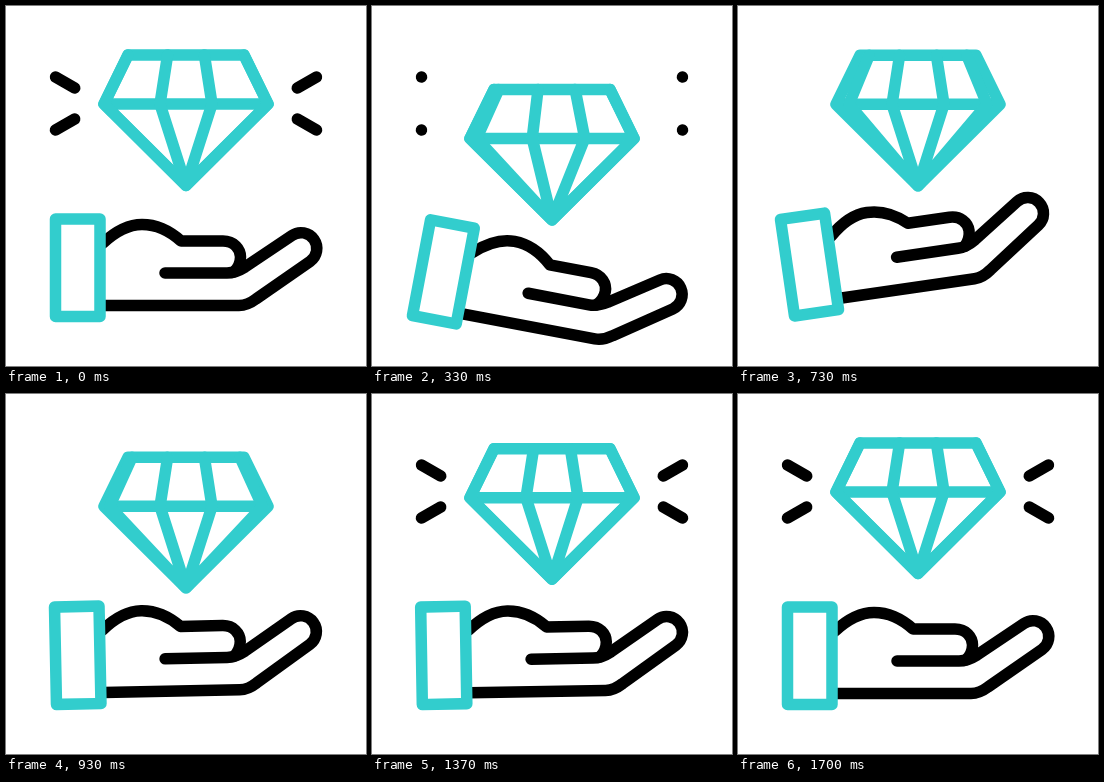
Animation, 360 px wide and 360 px high, one loop 2000 ms. Source, as an HTML page:

```html
<!DOCTYPE html>
<html lang="en">
<head>
<meta charset="utf-8">
<title>Diamond over hand</title>
<style>
  html, body { margin: 0; width: 100%; height: 100%; overflow: hidden; background: #fff; }
  svg { display: block; width: 100vw; height: 100vh; }
  path, line { fill: none; stroke: #000; stroke-width: 11.5; stroke-linecap: round; stroke-linejoin: round; }
  .teal, .teal path { stroke: #32cdcd; }
</style>
</head>
<body>
<svg viewBox="0 0 360 360">
  <g id="sparks"></g>
  <g id="hand">
    <path d="M97 237C110 225 122 218.500 136 218.500C153 218.500 165 226 175 235H217C228 235 234.500 243 234.500 251C234.500 257 232 262 228 266"/>
    <path d="M159 267H221C229 267 235 263.500 239 261L286 229.500A15.800 15.800 0 0 1 304 255.500L250 293C244 297.500 240 299.500 233 299.500H97"/>
    <path class="teal" d="M49.500 213H94V310.500H49.500Z"/>
  </g>
  <g id="gem" class="teal">
    <path d="M122 49H238L262 98L180 179.500L98 98ZM98 98H262"/>
    <path id="facets"/>
  </g>
</svg>
<script>
const LOOP = 2000, FRAME = 100 / 3;
const CENTER = 180, HALF = 82, INNER = 26, TOP_SCALE = 58 / 82;
const byId = id => document.getElementById(id);
const clamp = (v, lo, hi) => Math.min(hi, Math.max(lo, v));
const mix = (a, b, u) => a + (b - a) * u;

// Sine ease in and out between two times
function ease(t, from, to) {
  return (1 - Math.cos(Math.PI * clamp((t - from) / (to - from), 0, 1))) / 2;
}

// Swing through the turning points, given as [time, value]
function swing(t, turns) {
  return turns.reduce((value, [time, next], i) =>
    i ? mix(value, next, ease(t, turns[i - 1][0], time)) : next, 0);
}

const tilt = t => swing(t, [[30, 0], [395, 11.5], [793, -9.4], [1050, 5], [1400, -1.1], [1700, 0]]);
const drop = t => swing(t, [[30, 0], [320, 34.5], [760, 0], [1050, 22], [1530, 0]]);

// Each facet line slides one station to the right; the rim opens a little meanwhile
function facetPath(t) {
  const rim = swing(t, [[333, HALF], [733, 69], [1100, HALF]]);
  const stations = [-rim, -INNER, INNER, rim];
  const shift = ease(t, 250, 620);
  let d = '';
  for (let i = -1; i <= 3; i++) {
    const k = clamp(i + shift, 0, 3), j = Math.min(2, Math.floor(k));
    const x = mix(stations[j], stations[j + 1], k - j);
    d += `M${CENTER + x * TOP_SCALE} 49L${CENTER + x} 98L${CENTER} 179.5`;
  }
  return d;
}

// One spark per corner, mirrored around the gem
const sparks = [-1, 1].flatMap(sx => [-1, 1].map(sy => ({
  sx, sy,
  line: byId('sparks').appendChild(document.createElementNS('http://www.w3.org/2000/svg', 'line'))
})));

function drawSparks(t) {
  const tail = t < 700 ? 0 : 1 - ease(t, 933, 1233);
  const head = t < 700 ? 1 - ease(t, 33, 333) : 1;
  for (const { sx, sy, line } of sparks) {
    const set = (n, u) => {
      line.setAttribute('x' + n, CENTER + sx * mix(130.5, 111.3, u));
      line.setAttribute('y' + n, 97.5 + sy * mix(26.5, 15.5, u));
    };
    set(1, tail);
    set(2, Math.max(head, tail + 0.001));
    line.style.display = t > 340 && t < 940 ? 'none' : '';
  }
}

function draw(t) {
  byId('hand').setAttribute('transform', `rotate(${tilt(t)} 49.5 261.8)`);
  byId('gem').setAttribute('transform', `translate(0 ${drop(t)})`);
  byId('facets').setAttribute('d', facetPath(t));
  drawSparks(t);
}

const start = performance.now();
function tick() {
  const t = (performance.now() - start) % LOOP;
  draw(Math.floor((t + 4) / FRAME) * FRAME);
  requestAnimationFrame(tick);
}
tick();
</script>
</body>
</html>
```
